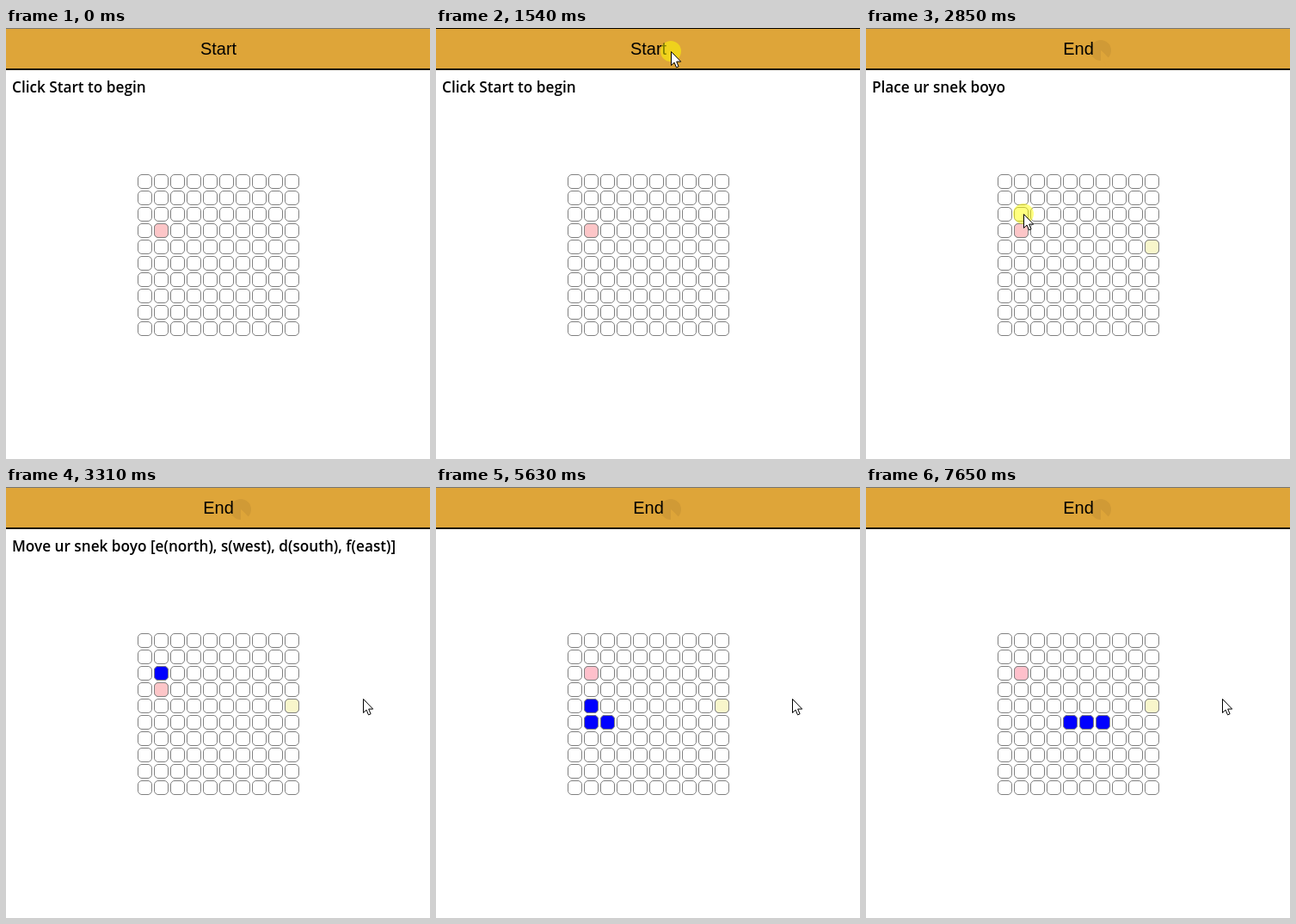
Write an HTML page with a canvas that moves like this. It is 493 px wide and 501 px high and loops after 8 s.

```html
<!DOCTYPE html>
<html lang="en">
<head>
<meta charset="utf-8">
<title>Snek</title>
<style>
  html, body { margin: 0; width: 100%; height: 100%; overflow: hidden; background: #fff; }
  canvas { display: block; }
</style>
</head>
<body>
<canvas id="stage" width="493" height="501"></canvas>
<script>
const ctx = document.getElementById('stage').getContext('2d');
const LOOP = 8000, PRESS = 1540, BEGIN = 1620, AIM = 2770, PLACE = 2920, GO = 3620;
const ORANGE = '#dea539';

// Head positions of the snake: [time, column, row]
const heads = [
  [PLACE, 1, 2], [4150, 1, 3], [4630, 1, 4], [5160, 1, 5], [5630, 2, 5],
  [6110, 3, 5], [6640, 4, 5], [7120, 5, 5], [7650, 6, 5]
];

// Pointer positions: [time, x, y], straight lines in between
const track = [
  [69, 500, 510], [70, 484, 490], [220, 430, 340], [370, 350, 150], [520, 303, 50],
  [670, 285, 11], [840, 282, 15], [990, 273, 26], [1930, 273, 27], [2080, 265, 48],
  [2310, 230, 125], [2540, 201, 198], [2690, 193, 216], [AIM, 183, 216],
  [2850, 183, 216], [2930, 205, 236], [3010, 262, 264], [3090, 330, 274],
  [3170, 388, 263], [3310, 415, 246], [3460, 415, 246], [3540, 414, 245],
  [5559, 414, 245], [5560, 414, 246], [LOOP, 414, 246]
];

function pointerAt(t) {
  if (t < track[0][0]) return track[0].slice(1);
  const i = track.findIndex(p => p[0] > t);
  const [t0, x0, y0] = track[i - 1], [t1, x1, y1] = track[i];
  const k = (t - t0) / (t1 - t0);
  return [Math.round(x0 + (x1 - x0) * k), Math.round(y0 + (y1 - y0) * k)];
}

function rect(color, x, y, w, h) {
  ctx.fillStyle = color;
  ctx.fillRect(x, y, w, h);
}

function disc(color, x, y, r) {
  ctx.fillStyle = color;
  ctx.beginPath();
  ctx.arc(x, y, r, 0, 7);
  ctx.fill();
}

function text(str, x, y, font, align) {
  ctx.font = font;
  ctx.textAlign = align;
  ctx.fillStyle = '#000';
  ctx.fillText(str, x, y);
}

function cell(col, row, fill) {
  ctx.beginPath();
  ctx.roundRect(153.5 + 19 * col, 170.5 + 19 * row, 16, 16, 4.5);
  ctx.fillStyle = fill;
  ctx.fill();
  ctx.strokeStyle = '#808080';
  ctx.stroke();
}

function arrow(x, y, fill, line) {
  const pts = [[0, 0], [0, 16], [3.6, 12.6], [6, 18.4], [8.6, 17.3], [6.2, 11.6], [11.2, 11.6]];
  ctx.beginPath();
  for (const [px, py] of pts) ctx.lineTo(x + 0.5 + px, y + 0.5 + py);
  ctx.closePath();
  ctx.fillStyle = fill;
  ctx.fill();
  ctx.strokeStyle = line;
  ctx.stroke();
}

function header(t) {
  rect(ORANGE, 0, 0, 493, 48);
  rect(t >= PRESS && t < AIM ? '#000' : '#767676', 0, 0, 493, 1);
  rect('#1c160a', 0, 47, 493, 2);
  if (t >= BEGIN) {
    disc('#d09a36', 273, 26, 12);
    arrow(273, 26, ORANGE, ORANGE);
  }
  text(t < BEGIN ? 'Start' : 'End', 247, 31, '20px "Liberation Sans", Arial, sans-serif', 'center');
}

function status(t) {
  const str = t < BEGIN ? 'Click Start to begin'
    : t < PLACE ? 'Place ur snek boyo'
    : t < GO ? 'Move ur snek boyo [e(north), s(west), d(south), f(east)]' : '';
  text(str, 7, 75, '600 17.2px "Open Sans", "Noto Sans", sans-serif', 'left');
}

function board(t) {
  for (let i = 0; i < 100; i++) cell(i % 10, Math.floor(i / 10), '#fff');
  if (t >= BEGIN) cell(9, 4, '#f8f6cb');
  if (t < 4150) cell(1, 3, '#fdc6c8');
  else if (t < 5630) cell(2, 5, '#ffc0cb');
  else cell(1, 2, '#ffc0cb');
  const past = heads.filter(h => h[0] <= t);
  const size = t < 4150 ? 1 : t < 5630 ? 2 : 3;
  for (const [, col, row] of past.slice(-size)) cell(col, row, '#00f');
}

function draw(t) {
  rect('#fff', 0, 0, 493, 501);
  header(t);
  status(t);
  board(t);
  const [x, y] = pointerAt(t);
  if ((t >= PRESS && t < BEGIN) || (t >= AIM && t < PLACE)) disc('rgba(255,255,0,.5)', x, y, 12);
  arrow(x, y, '#fff', '#000');
}

function frame() {
  draw(performance.now() % LOOP);
  requestAnimationFrame(frame);
}
frame();
</script>
</body>
</html>
```
